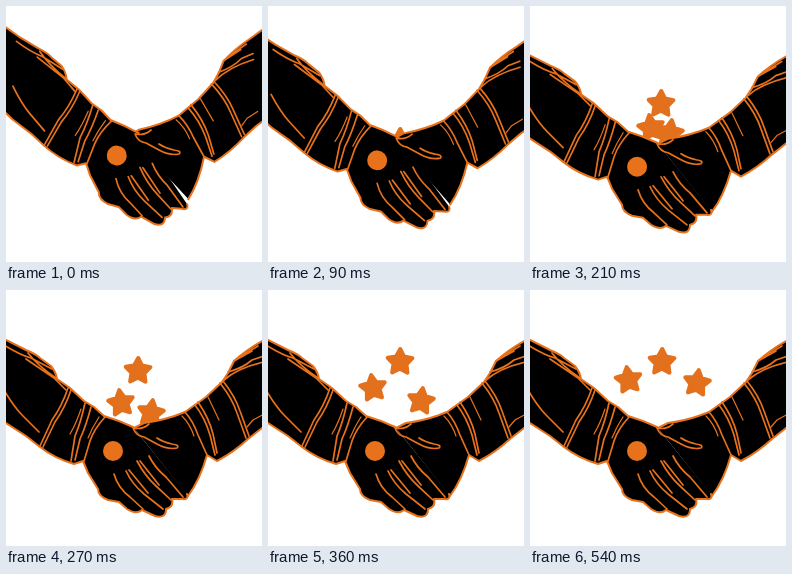
These frames come from a looping animation (256 px wide and 256 px high, 900 ms). An HTML page:

```html
<!DOCTYPE html>
<html lang="en">
<head>
<meta charset="utf-8">
<title>Handshake</title>
<style>
  html, body { margin: 0; width: 100%; height: 100%; overflow: hidden; background: #fff; }
  svg { display: block; width: 100vw; height: 100vh; }
  .arm { fill: #000; stroke: #e8721c; stroke-width: 2; stroke-linejoin: round; stroke-linecap: round; }
  .line { fill: none; stroke-width: 1.7; }
  .fine { fill: none; stroke-width: 1.2; }
  .star { fill: #e2701c; stroke: #e2701c; stroke-width: 4; stroke-linejoin: round; }
</style>
</head>
<body>
<svg viewBox="0 0 256 256">
  <g id="stars"></g>

  <g id="right" class="arm">
    <path d="M128 138 L138 133 Q160 130 179 122 L200 107 216 92 222 83 228 71 Q240 60 256 51 L290 30
             V118 L256 138 242 149 Q228 162 211 171 L201 165 Q194 190 182 206"/>
    <path class="line" d="M179 122 Q187 131 192 145 L201 165 M189 115 Q199 128 204 145 L209 165
             M192 112 Q203 128 207 144 L211 163 M214 93 Q226 108 231 123 L240 148
             M217 91 Q229 106 234 121 L243 146"/>
    <path class="line" d="M222 82 Q237 78 246 70 L258 66 M218 90 Q232 78 258 72 M228 71 L246 61 M235 66 L252 56"/>
    <path class="fine" d="M258 124 L247 130 241 137 M176 126 Q184 134 188 146 M202 107 L213 130"/>
  </g>

  <g id="left" class="arm">
    <path d="M181 204 Q183 210 176 209 L166 209 Q168 217 160 219 Q160 229 149 226 L136 220
             Q130 225 121 219 L113 212 102 210 Q92 206 92 199 L82 183 77 171 68 174
             Q48 168 34 157 L20 146 0 133 -30 108 V32 L0 50 20 60 Q30 64 34 68 L45 76
             Q50 82 51 89 L64 98 78 111 88 117 98 126 Q112 130 127 137"/>
    <path class="line" d="M62 98 Q56 116 46 130 L34 156 M65 100 Q59 118 49 132 L37 157
             M79 113 Q75 132 69 146 L65 171 M85 117 Q80 136 74 149 L69 170
             M99 127 Q88 139 84 151 L78 171"/>
    <path class="line" d="M-2 55 Q14 65 25 68 L46 79 M22 63 Q32 76 50 88 M20 69 L48 88 60 100
             M-2 100 Q8 117 17 126 L33 142"/>
    <path class="fine" d="M75 119 Q70 134 64 144 M93 127 Q86 138 82 148"/>
    <path class="line" d="M108 184 Q112 198 124 207 L137 219 M120 181 Q126 194 138 204 L157 219
             M123 180 L142 203 M131 171 Q139 186 150 196 L165 210 M134 171 L153 195
             M143 166 Q149 178 160 187 L177 207"/>
    <circle cx="107" cy="161" r="10" fill="#e8721c" stroke="none"/>
  </g>

  <g id="thumb" class="arm">
    <path class="line" d="M127 138 Q130 146 138 147 L151 154 Q162 160 171 158 Q174 155 166 154 Q157 152 151 148
             M128 138 Q136 140 143 134"/>
  </g>
</svg>
<script>
const LOOP = 900, STEP = 30, SETTLE = 215;
const $ = id => document.getElementById(id);

// Each key is [ms, x, y].
const stars = [
  { tilt: 1, keys: [[0, 132, 164], [90, 132, 136], [150, 131, 117], [210, 131, 98], [270, 132, 81], [360, 132, 72]] },
  { tilt: -8, keys: [[90, 132, 152], [150, 131, 133], [210, 121, 122], [270, 115, 113], [360, 105, 98], [540, 98.5, 90]] },
  { tilt: 8, keys: [[90, 134, 156], [150, 134, 141], [210, 140, 127], [270, 145, 123], [360, 153, 111], [540, 167, 93]] }
];

const starPoints = Array.from({ length: 10 }, (_, i) => {
  const r = i % 2 ? 6.8 : 13, a = i * Math.PI / 5;
  return `${r * Math.sin(a)},${-r * Math.cos(a)}`;
}).join(' ');

for (const s of stars) {
  s.el = document.createElementNS('http://www.w3.org/2000/svg', 'polygon');
  s.el.setAttribute('class', 'star');
  s.el.setAttribute('points', starPoints);
  $('stars').append(s.el);
}

function position(keys, t) {
  if (t <= keys[0][0]) return keys[0].slice(1);
  const i = keys.findIndex(k => k[0] > t);
  if (i < 0) return keys[keys.length - 1].slice(1);
  const a = keys[i - 1], b = keys[i], p = (t - a[0]) / (b[0] - a[0]);
  return [a[1] + (b[1] - a[1]) * p, a[2] + (b[2] - a[2]) * p];
}

const place = (id, transform) => $(id).setAttribute('transform', transform);

function draw(t) {
  const lift = Math.max(0, 1 - t / SETTLE);
  place('left', `translate(${4 * lift} ${-11 * lift}) rotate(${4.5 * lift} 112 158)`);
  place('right', `translate(${-4 * lift} ${-11 * lift}) rotate(${-4.5 * lift} 160 150)`);
  place('thumb', `translate(${2 * lift} ${-10 * lift})`);
  for (const s of stars) {
    const [x, y] = position(s.keys, t);
    s.el.setAttribute('transform', `translate(${x} ${y}) rotate(${s.tilt})`);
  }
}

const start = performance.now();
function tick() {
  const t = (performance.now() - start) % LOOP;
  draw(Math.floor(t / STEP) * STEP);
  requestAnimationFrame(tick);
}
tick();
</script>
</body>
</html>
```
